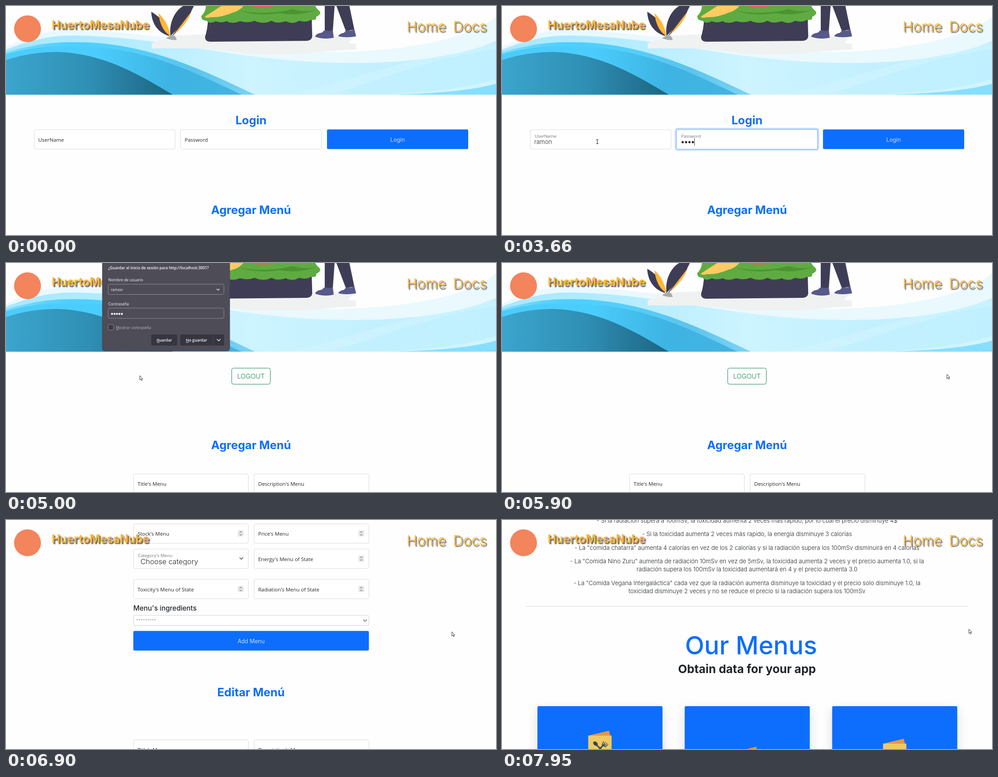
An HTML page with a canvas that plays this animation: 1093x513 px, repeating every 8 s.

```html
<!DOCTYPE html>
<html lang="es">
<head>
<meta charset="utf-8">
<title>HuertoMesaNube</title>
<style>
html, body { margin: 0; width: 100%; height: 100%; overflow: hidden; background: #fefefe; }
canvas { display: block; width: 100vw; height: 100vh; }
</style>
</head>
<body>
<canvas id="stage"></canvas>
<script>
const W = 1093, H = 513, LOOP = 8000, TICK = 70;
const BLUE = '#0d6efd', INK = '#212529', NAVY = '#3f3d56', AMBER = '#ffb638';
const USER = 'ramon', BRAND = 'HuertoMesaNube';
const canvas = document.getElementById('stage');
const ctx = canvas.getContext('2d');
const dpr = window.devicePixelRatio || 1;
canvas.width = W * dpr;
canvas.height = H * dpr;

const poppy = (weight, px) => `${weight} ${px}px Inter, sans-serif`;
const plain = (weight, px) => `${weight} ${px}px "Open Sans", sans-serif`;
const clamp = v => Math.max(0, Math.min(1, v));
const span = (t, from, to) => clamp((t - from) / (to - from));
const smooth = p => p * p * (3 - 2 * p);
const easeOut = p => 1 - (1 - p) ** 3;
const mix = (a, b, p) => a + (b - a) * p;
const snap = t => 6900 + Math.floor((t - 6900) / TICK) * TICK;

function text(str, x, y, font, color = INK, align = 'left') {
  ctx.font = font;
  ctx.fillStyle = color;
  ctx.textAlign = align;
  ctx.fillText(str, x, y);
}

function shape(color, d) {
  ctx.fillStyle = color;
  ctx.fill(new Path2D(d));
}

function line(color, width, d) {
  ctx.strokeStyle = color;
  ctx.lineWidth = width;
  ctx.stroke(new Path2D(d));
}

function box(x, y, w, h, fill, border, r = 3) {
  ctx.beginPath();
  ctx.roundRect(x, y, w, h, r);
  if (fill) { ctx.fillStyle = fill; ctx.fill(); }
  if (border) { ctx.strokeStyle = border; ctx.lineWidth = 1; ctx.stroke(); }
}

function dot(x, y, r, color) {
  ctx.fillStyle = color;
  ctx.beginPath();
  ctx.arc(x, y, r, 0, Math.PI * 2);
  ctx.fill();
}

function chevron(x, y, r, color, up = 1) {
  line(color, 1.3, `M${x - r} ${y - r / 2 * up}L${x} ${y + r / 2 * up}L${x + r} ${y - r / 2 * up}`);
}

function fade(x0, x1, ...colors) {
  const g = ctx.createLinearGradient(x0, 0, x1, 0);
  colors.forEach((c, i) => g.addColorStop(i / (colors.length - 1), c));
  return g;
}

// Hero

function drawWaves() {
  shape('#e9f9fe', 'M0 92C45 70 85 54 140 54C270 54 400 78 540 94C750 116 1000 100 1093 24V198.5H0Z');
  shape(fade(0, W, '#a8e8ff', '#b4ecff', '#cdf4ff', '#c3f0fe', '#c0f0ff'),
    'M0 98C50 78 95 66 150 66C300 68 430 98 560 114C780 142 990 126 1093 78V198.5H0Z');
  shape('rgba(226,248,255,.25)', 'M640 198.5C760 172 880 118 1093 84V96C930 122 820 172 720 198.5Z');
  shape('#d0f4ff', 'M810 198.5C920 196 1010 188 1093 164V198.5Z');
  shape('#86dfff', 'M860 198.5C960 196 1035 190 1093 174V198.5Z');
  shape(fade(0, 555, '#7edcff', '#4ecffc', '#54cffb', '#5cc4ee', '#7cd3f4'),
    'M0 104C60 86 100 81 150 81C300 80 417 132 555 198.5H0Z');
  shape(fade(200, 525, '#4bcdfb', '#3db4e4', '#44b3e0'),
    'M0 108C60 91 110 89 160 91C305 92 408 142 525 198.5H0Z');
  shape(fade(0, 372, '#3ba5cd', '#2f8fb4', '#1c6482'),
    'M0 121C40 108 75 103 115 103C220 106 300 156 372 198.5H0Z');
}

function drawScene() {
  shape('#f0f1f1', 'M325 83C345 80 360 69 385 66C470 60 620 61 690 65Q740 68 781 72V98C720 98 680 109 590 108C520 108 500 96 420 95H325Z');
  shape('#fff', 'M781 72Q767 73 768 78Q760 83 770 84L781 83Z');

  // Plant
  shape(NAVY, 'M324 13C350 28 360 46 364 67C344 62 325 44 324 13Z');
  shape(AMBER, 'M340 16C356 30 363 48 367 67C353 60 343 42 340 16Z');
  shape(NAVY, 'M367 67C363 40 375 12 395 0H419C409 23 388 47 367 67Z');
  shape(AMBER, 'M413 12C411 28 390 53 371 67Z');
  line(NAVY, 1.4, 'M413 12L371 67');
  shape('#a9a9ab', 'M357 72L367 66L377 67L381 76Q367 77 357 72Z');

  // Burger
  shape(NAVY, 'M451 28Q449 55 444 69Q444 80 456 80L672 78Q684 76 683 65L682 28Z');
  shape('#5fab41', 'M436 22Q434 32 447 33Q455 41 468 34Q480 39 492 34Q505 41 522 34Q540 39 554 33Q574 42 592 33Q606 41 624 34Q640 42 654 33Q669 38 680 31Q694 33 692 24Q705 18 699 11Q692 5 690 0H446Q445 14 436 22Z');
  shape('#4c9433', 'M520 10Q575 22 640 7Q665 15 692 9Q650 24 610 16Q560 24 520 10Z');
  shape('#e85d5d', 'M542 0Q573 7 603 0Z');
  shape('#ffcb62', 'M443 24L480 0H530Q517 13 505 15Q480 26 457 25Q448 28 443 24Z');

  // Legs
  shape(NAVY, 'M711 0H733L729 56H711Z');
  shape(NAVY, 'M737 0H766L777 53L758 56Z');
  shape('#575a89', 'M690 69Q690 62 704 60L711 54Q721 58 729 54L731 71Q710 76 690 69Z');
  shape('#575a89', 'M741 68Q743 62 754 60L759 54Q770 57 777 52L781 68Q760 72 741 68Z');
}

function drawHeader() {
  ctx.save();
  ctx.shadowColor = 'rgba(35,35,45,.75)';
  ctx.shadowOffsetX = ctx.shadowOffsetY = 2.5 * dpr;
  ctx.shadowBlur = 2 * dpr;
  text(BRAND, 102, 51, poppy(700, 25.2), AMBER);
  text('Home', 893.5, 57, poppy(300, 31.5), AMBER);
  text('Docs', 997, 57, poppy(300, 31.5), AMBER);
  ctx.restore();
  dot(48, 51, 30, '#f3845c');
}

// Form parts

function heading(str, y) {
  text(str, 546.5, y, poppy(700, 25.6), BLUE, 'center');
}

function button(str, x, y, w) {
  box(x, y, w, 44, BLUE);
  text(str, x + w / 2, y + 27, poppy(300, 12.5), '#fff', 'center');
}

function field(label, x, y, w, lift = 0, ring = 0) {
  if (ring) box(x - 3.5, y - 3.5, w + 7, 51, `rgba(13,110,253,${.25 * ring})`, null, 6);
  box(x + .5, y + .5, w - 1, 43.5, '#fff', ring > .5 ? '#86b7fe' : '#d6dade');
  ctx.globalAlpha = mix(1, .65, lift);
  text(label, x + 9.5 + lift, y + mix(27, 18, lift), plain(400, 11.5 * mix(1, .85, lift)));
  ctx.globalAlpha = 1;
}

function numberField(label, x, y) {
  field(label, x, y, 257);
  box(x + 233, y + 15, 13, 14, '#e9e9ed', null, 0);
  chevron(x + 239.5, y + 19, 2.5, '#8a8a90', -1);
  chevron(x + 239.5, y + 25, 2.5, '#8a8a90');
}

function menuForm(y, action) {
  const L = 284, R = 553;
  field("Title's Menu", L, y, 257);
  field("Description's Menu", R, y, 257);
  numberField("Stock's Menu", L, y + 56);
  numberField("Price's Menu", R, y + 56);
  const cat = y + 112.5;
  field("Category's Menu", L, cat, 257, 1);
  ctx.save();
  ctx.beginPath();
  ctx.rect(L, cat, 257, 37.5);
  ctx.clip();
  text('Choose category', 300, cat + 34.5, poppy(300, 16.1));
  ctx.restore();
  chevron(525, cat + 21.5, 4, '#343a40');
  numberField("Energy's Menu of State", R, cat);
  numberField("Toxicity's Menu of State", L, y + 180.5);
  numberField("Radiation's Menu of State", R, y + 180.5);
  text("Menu's ingredients", L, y + 251, poppy(500, 15.4));
  box(L + .5, y + 261.5, 525, 23, '#fff', '#cdd1d5');
  text('---------', 290, y + 275, poppy(300, 11));
  chevron(801, y + 273, 4, '#555');
  button(action, L, y + 296.5, 525.5);
}

// Pages

function blink(t, starts) {
  const last = starts.filter(s => s <= t).pop();
  return (t - last) % 1000 < 500;
}

function caret(x, y) {
  ctx.fillStyle = '#444';
  ctx.fillRect(Math.round(x), y, 1, 17);
}

function drawLogin(t) {
  const onUser = 630, onPass = 2180;
  const userKeys = [1450, 1580, 1720, 1850, 1980];
  const passKeys = [2970, 3170, 3440, 3660, 3860];
  const typed = keys => keys.filter(k => t >= k).length;
  const u = span(t, onUser, onUser + 150), p = span(t, onPass, onPass + 130);

  heading('Login', 265);
  field('UserName', 62.5, 276.5, 315, smooth(u), u * (1 - p));
  field('Password', 389, 276.5, 315, smooth(p), p);
  button('Login', 716, 276.5, 315);
  heading('Agregar Menú', 466);

  const name = USER.slice(0, typed(userKeys));
  text(name, 72, 309, poppy(300, 13.3));
  const nameWidth = ctx.measureText(name).width;
  const chars = typed(passKeys);
  for (let i = 0; i < chars; i++) dot(403 + i * 7.6, 305, 2.5, INK);
  if (t >= onPass) {
    if (blink(t, [onPass, ...passKeys])) caret(399 + chars * 7.6, 296);
  } else if (t >= onUser && blink(t, [onUser, ...userKeys])) {
    caret(72 + nameWidth, 296);
  }
}

const RULES = [
  [141, '- Todos los menús tienen un nivel de energía caloríca que va variando según el nivel de radiación y toxicidad'],
  [171.5, '- La toxicidad aumenta cada día y no puede superar los 30 y no puede ser negativo, si supera los 30 el menú NO ES CONSUMIBLE y el',
    'stock se vuelve a 0 debido a que todos los menús de ese tipo ya no serían consumibles'],
  [220, '- El nivel de energía nunca es superior a 30 y nunca es negativa, si llega a superar las 30 calorías, la energía se convierte en 0, esto',
    'quiere decir que el Menú ya no brindaría energía'],
  [269, '- Si la radiación supera a 100mSv, la toxicidad aumenta 2 veces más rapido, por lo cual el precio disminuye 4$'],
  [299, '- Si la toxicidad aumenta 2 veces más rapido, la energía disminuye 3 calorías'],
  [329.5, '- La "comida chatarra" aumenta 4 calorías en vez de los 2 calorías y si la radiación supera los 100mSv disminuirá en 4 calorías'],
  [360, '- La "Comida Nino Zuru" aumenta de radiación 10mSv en vez de 5mSv, la toxicidad aumenta 2 veces y el precio aumenta 1.0, si la',
    'radiación supera los 100mSv la toxicidad aumentará en 4 y el precio aumenta 3.0'],
  [409, '- La "Comida Vegana Intergaláctica" cada vez que la radiación aumenta disminuye la toxicidad y el precio solo disminuye 1.0, la',
    'toxicidad disminuye 2 veces y no se reduce el precio si la radiación supera los 100mSv']
];

function drawRules(top) {
  const font = poppy(300, 13.1);
  const link = `Para más info: https://github.com/RamonRuedasG/${BRAND}-Project`;
  text('REGLAS A TENER EN CUENTA A LA HORA DE ACTUALIZAR UN MENU', 546.5, top + 84, poppy(500, 14.6), INK, 'center');
  text(link, 546.5, top + 118, font, BLUE, 'center');
  const w = ctx.measureText(link).width;
  ctx.fillRect(546.5 - w / 2, top + 120, w, 1);
  for (const [y, ...lines] of RULES)
    lines.forEach((s, i) => text(s, 546.5, top + y + i * 18.3, font, INK, 'center'));
  ctx.fillStyle = '#d5d6d7';
  ctx.fillRect(53, top + 456, 987, 1);
}

function menuIcon(x, y) {
  ctx.save();
  ctx.translate(x, y);
  shape('#e8963f', 'M0 11L46 0L51 18V60H0Z');
  shape('#efc964', 'M0 11H52V72H0Z');
  line('#2f4858', 3, 'M16 30L38 50M36 30L16 50');
  line('#2f4858', 1.6, 'M34 24L31 32L38 36L44 31M38 25L34 33M42 28L36 34');
  ctx.fillStyle = '#2f4858';
  ctx.beginPath();
  ctx.ellipse(16, 29, 6, 4, .75, 0, Math.PI * 2);
  ctx.fill();
  ctx.restore();
}

function drawCards(top) {
  text('Our Menus', 555.5, top + 301, poppy(500, 56), BLUE, 'center');
  text('Obtain data for your app', 546.5, top + 343, poppy(700, 26), INK, 'center');
  [[79, 472], [407.5, 508], [736.5, 490]].forEach(([x, iconY]) => {
    ctx.save();
    ctx.shadowColor = 'rgba(0,0,0,.13)';
    ctx.shadowBlur = 26 * dpr;
    ctx.shadowOffsetY = 8 * dpr;
    box(x, top + 417, 279, 330, BLUE);
    ctx.restore();
    menuIcon(x + 113.5, top + iconY);
  });
}

function drawAdmin() {
  box(503.5, 235.5, 86, 36, null, '#198754', 4);
  text('LOGOUT', 546.5, 259, poppy(300, 14.8), '#198754', 'center');
  heading('Agregar Menú', 417);
  menuForm(472, 'Add Menu');
  heading('Editar Menú', 915);
  menuForm(1012, 'Edit Menu');
  drawRules(1332);
  drawCards(1595);
}

function drawPopup(hover) {
  const white = '#fbfbfe', dark = '#37353f', edge = '#8f8d99';
  box(215, -8, 284, 205, '#4e4c57', '#44424d', 5);
  text('¿Guardar el inicio de sesión para http://localhost:3001?', 228, 14, plain(600, 8.5), white);
  text('Nombre de usuario', 228, 41, plain(400, 8.6), white);
  box(228, 47.5, 258, 23, null, edge);
  text(USER, 234, 63, plain(400, 8.7), white);
  chevron(473, 59.5, 3, white);
  text('Contraseña', 228, 95, plain(400, 8.6), white);
  box(228, 101, 258, 23, null, edge);
  for (let i = 0; i < 5; i++) dot(236.5 + i * 5.5, 114, 2.2, white);
  box(228, 138, 12, 12, '#3a3843', edge, 2);
  text('Mostrar contraseña', 245, 147.5, plain(400, 8.6), '#b9b8c0');
  box(324, 160, 58, 25, dark);
  text('Guardar', 353, 176, plain(600, 8.7), white, 'center');
  box(388.5, 160, 98, 25, dark);
  if (hover) box(388.5, 160, 73, 25, '#5f5d69');
  text('No guardar', 425, 176, plain(600, 8.7), white, 'center');
  ctx.fillStyle = '#4e4c57';
  ctx.fillRect(461.5, 160, 1, 25);
  chevron(474.5, 172.5, 4, white);
  ctx.fillStyle = white;
  ctx.fillRect(336, 177.5, 7, .8);
  ctx.fillRect(401, 177.5, 7, .8);
  ctx.fillStyle = '#b9b8c0';
  ctx.fillRect(245, 149, 7, .8);
}

// Motion: start, end, x, y
const MOVES = [
  [130, 620, 212, 304], [4740, 5200, 425, 176], [5340, 5550, 521, 190],
  [5550, 5850, 992, 249], [6000, 6300, 994, 250], [7700, 7950, 1041, 244]
];

function pointerAt(t) {
  let x = 750, y = 440;
  for (const [from, to, nx, ny] of MOVES) {
    const p = smooth(span(t, from, to));
    x = mix(x, nx, p);
    y = mix(y, ny, p);
  }
  return [x, y];
}

const scrollAt = t => Math.round(
  473 * smooth(span(t, 5990, 6450)) +
  502 * smooth(span(t, 6825, 7220)) +
  620 * easeOut(span(t, 7330, 7853)));

function drawPointer(t) {
  const [x, y] = pointerAt(snap(t));
  const overInput = t < 4060 && y > 277 && y < 321 && (x < 377 || (x > 389 && x < 704));
  ctx.save();
  ctx.translate(Math.round(x), Math.round(y));
  if (overInput) {
    line('#222', 1, 'M-2 -4.5H3M-2 4.5H3M.5 -4.5V4.5');
  } else {
    const arrow = 'M.5 .5V10L2.7 8L4.3 11.5L5.8 10.8L4.3 7.5H7Z';
    shape('#fff', arrow);
    line('#222', .9, arrow);
  }
  ctx.restore();
}

function draw(t) {
  ctx.setTransform(dpr, 0, 0, dpr, 0, 0);
  ctx.fillStyle = '#fefefe';
  ctx.fillRect(0, 0, W, H);
  const loading = t >= 4130 && t < 4330;
  if (!loading) {
    ctx.save();
    ctx.translate(0, -scrollAt(snap(t)));
    drawWaves();
    drawScene();
    if (t < 4130) drawLogin(t);
    else drawAdmin();
    ctx.restore();
    drawHeader();
  }
  if (t >= 4200 && t < 5400) drawPopup(t >= 5130);
  if (t >= 130) drawPointer(t);
}

const begin = performance.now();
function frame() {
  draw((performance.now() - begin) % LOOP);
  requestAnimationFrame(frame);
}
frame();
</script>
</body>
</html>
```
